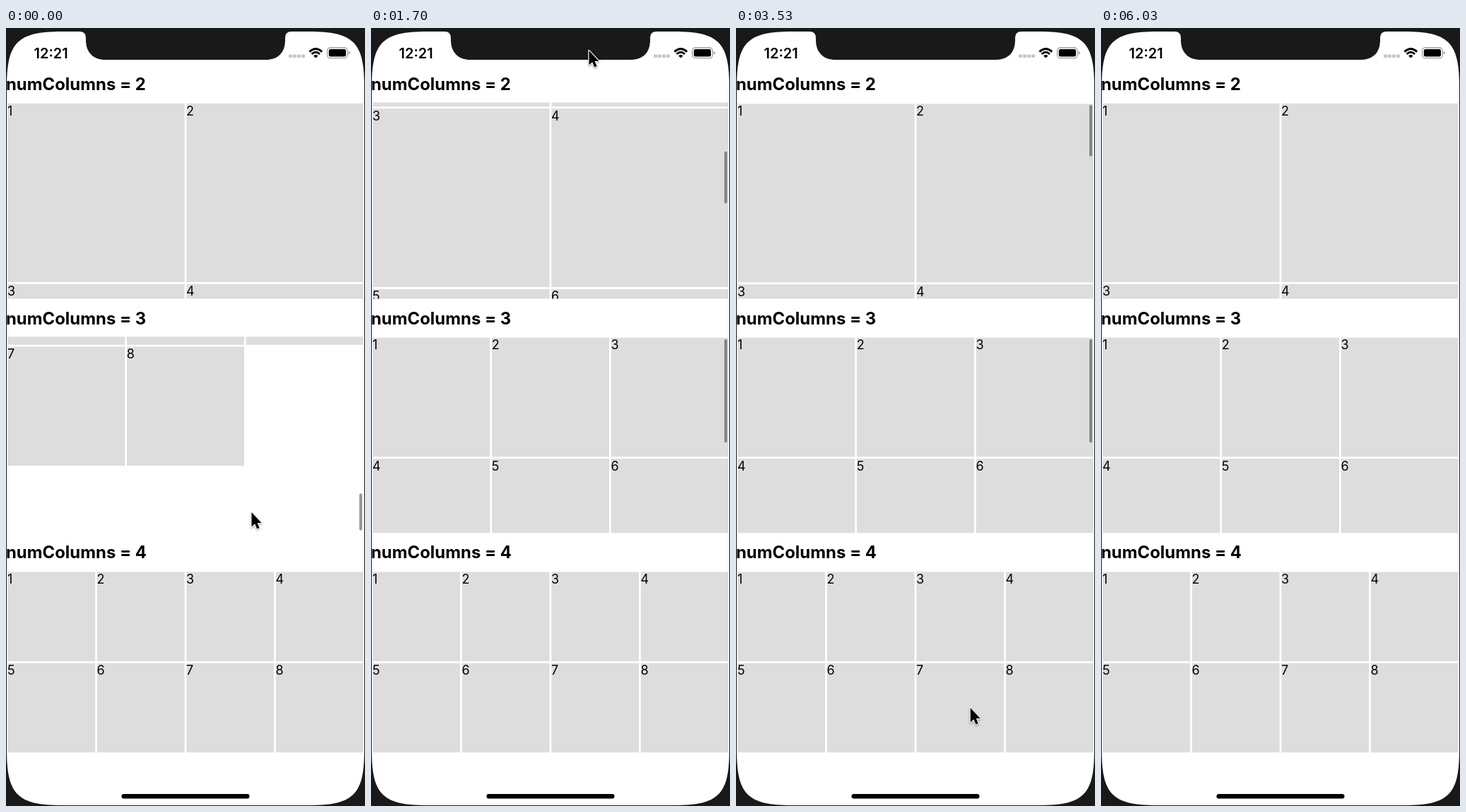
An HTML page for the animation above (6360 ms loop, 508 px wide and 1102 px high).

```html
<!DOCTYPE html>
<html lang="en">
<head>
<meta charset="utf-8">
<title>numColumns</title>
<style>
  html, body { margin: 0; width: 100%; height: 100%; overflow: hidden; background: #191919; }
  svg { display: block; }
  #stage { position: absolute; left: 0; top: 0; }
  text { font-family: Inter, Roboto, sans-serif; fill: #000; }
  .head { font-size: 23.9px; font-weight: 700; }
  .num { font-size: 18px; }
  .clock { font-size: 20px; font-weight: 600; }
  .cell { fill: #ddd; }
  .bar { fill: #000; fill-opacity: .4; }
  #cursor { filter: drop-shadow(0 1px 1.2px rgba(0, 0, 0, .4)); }
</style>
</head>
<body>
<svg id="stage" width="508" height="1102" viewBox="0 0 508 1102">
  <rect width="508" height="1102" fill="#191919"/>
  <path fill="#fff" d="M1 84C1 20 16 5 80 5H428C492 5 507 20 507 84V1022C507 1086 492 1101 428 1101H80C16 1101 1 1086 1 1022Z"/>
  <path fill="#191919" d="M104 4V5Q113 5 113 14V17C113 35 124 45 141 45H367C385 45 395 35 395 17V14Q395 5 404 5V4Z"/>
  <text class="clock" x="39.5" y="42.5">12:21</text>
  <g fill="#c6c6c6">
    <rect x="400" y="37.5" width="5" height="4.5" rx="1"/>
    <rect x="406" y="37.5" width="5" height="4.5" rx="1"/>
    <rect x="412" y="37.5" width="5" height="4.5" rx="1"/>
    <rect x="418" y="37.5" width="5" height="4.5" rx="1"/>
  </g>
  <g fill="none" stroke="#000" stroke-width="2.8">
    <path d="M429.4 33.6Q438.3 25.4 447.2 33.6"/>
    <path d="M432.6 37Q438.3 31.6 444 37"/>
  </g>
  <path d="M435.2 39.4Q438.3 36.8 441.4 39.4L438.3 42.6Z"/>
  <rect x="454.6" y="28" width="28.6" height="14.6" rx="4" fill="none" stroke="#a0a0a0" stroke-width="1.3"/>
  <rect x="456.8" y="30" width="24.2" height="10.6" rx="2.4"/>
  <path fill="#a0a0a0" d="M484.6 32.8Q487 33.6 487 35.3T484.6 37.8Z"/>
  <g id="lists"></g>
  <rect x="163.5" y="1085" width="181" height="6.4" rx="3.2"/>
  <g id="cursor">
    <path d="M1.5 3V23.5L6.2 19.2L9.2 26.4L12.6 25L9.6 18H15.6Z" stroke="#fff" stroke-width="2.4" paint-order="stroke" stroke-linejoin="round"/>
  </g>
</svg>
<script>
const LOOP = 6360;
const NS = 'http://www.w3.org/2000/svg';
const WIDTH = 506, VIEW = 278, MARGIN = 1.35, TRACK = 271, ITEMS = 8;

const smooth = u => u * u * (3 - 2 * u);
const out = u => 1 - (1 - u) ** 3;
const linear = u => u;
const clamp = (v, lo, hi) => Math.min(hi, Math.max(lo, v));

// Keys are [time, value, easing into this key].
function sample(keys, t) {
  if (t <= keys[0][0]) return keys[0][1];
  for (let i = 1; i < keys.length; i++) {
    const [t1, v1, ease = smooth] = keys[i];
    if (t < t1) {
      const [t0, v0] = keys[i - 1];
      return v0 + (v1 - v0) * ease((t - t0) / (t1 - t0));
    }
  }
  return keys[keys.length - 1][1];
}

function add(parent, tag, attrs, text) {
  const el = document.createElementNS(NS, tag);
  for (const name in attrs) el.setAttribute(name, attrs[name]);
  if (text !== undefined) el.textContent = text;
  return parent.appendChild(el);
}

function makeList(cols, index, barFrom, keys) {
  const root = document.getElementById('lists');
  const top = 105.5 + index * 331.8;
  add(root, 'text', { class: 'head', x: 0, y: top - 17.8 }, 'numColumns = ' + cols);
  const port = add(root, 'svg', { x: 1, y: top, width: WIDTH, height: VIEW, overflow: 'hidden' });
  const body = add(port, 'g', {});
  const size = WIDTH / cols, pitch = size + 2 * MARGIN;
  for (let i = 0; i < ITEMS; i++) {
    const x = (i % cols) * size + MARGIN;
    const y = Math.floor(i / cols) * pitch + MARGIN;
    add(body, 'rect', { class: 'cell', x, y, width: size - 2 * MARGIN, height: size });
    add(body, 'text', { class: 'num', x: x - .3, y: y + 16.7 }, i + 1);
  }
  const height = Math.ceil(ITEMS / cols) * pitch;
  const bar = height > VIEW && add(port, 'rect', { class: 'bar', x: 499, width: 4, rx: 2 });
  return { body, bar, height, barFrom, keys };
}

function drawList({ body, bar, height, barFrom, keys }, t) {
  const pos = sample(keys, t);
  body.setAttribute('transform', `translate(0 ${-pos})`);
  if (!bar) return;
  const max = height - VIEW;
  const over = Math.max(0, -pos, pos - max);
  const full = TRACK * VIEW / height;
  const len = Math.max(8, full - over);
  const y = pos > max ? TRACK - len : clamp(pos / max, 0, 1) * (TRACK - full);
  bar.setAttribute('y', 3.5 + y);
  bar.setAttribute('height', len);
  bar.setAttribute('opacity', t < barFrom ? 0 : clamp((6000 - t) / 330, 0, 1));
}

const lists = [
  makeList(2, 0, 1460, [
    [1440, 0], [1700, 248.5], [1870, 248.5], [2200, 790, out], [2540, 745],
    [2970, 745], [3100, -32, linear], [3180, -42, out], [3640, 0, out]
  ]),
  makeList(3, 1, 0, [
    [30, 330], [270, 237, out], [330, 237], [630, -38], [830, -38], [1480, 0, out]
  ]),
  makeList(4, 2, 0, [
    [3680, 0], [4070, 70, out], [4150, 80], [4370, 0, out],
    [5000, 0], [5110, -40, out], [5200, -30.5], [5660, 0, out]
  ])
];

const cursor = document.getElementById('cursor');
const cursorX = [
  [30, 346], [630, 342.5], [830, 342.5], [1430, 318], [1700, 307], [1870, 307],
  [2280, 325], [2670, 322], [2970, 322], [3100, 332], [3640, 330], [4070, 325]
];
const cursorY = [
  [30, 683], [300, 573], [630, 889], [830, 889], [1430, 244], [1700, 29], [1870, 29],
  [2280, 710], [2530, 633], [2670, 157], [2970, 157], [3100, 969, linear],
  [3200, 1004, out], [3640, 952], [4070, 781, out], [4160, 741, out]
];

function draw(t) {
  lists.forEach(list => drawList(list, t));
  cursor.setAttribute('transform', `translate(${sample(cursorX, t)} ${sample(cursorY, t)})`);
  cursor.setAttribute('visibility', t < 5000 ? 'visible' : 'hidden');
}

const start = performance.now();
function tick() {
  draw((performance.now() - start) % LOOP);
  requestAnimationFrame(tick);
}
draw(0);
requestAnimationFrame(tick);
</script>
</body>
</html>
```
